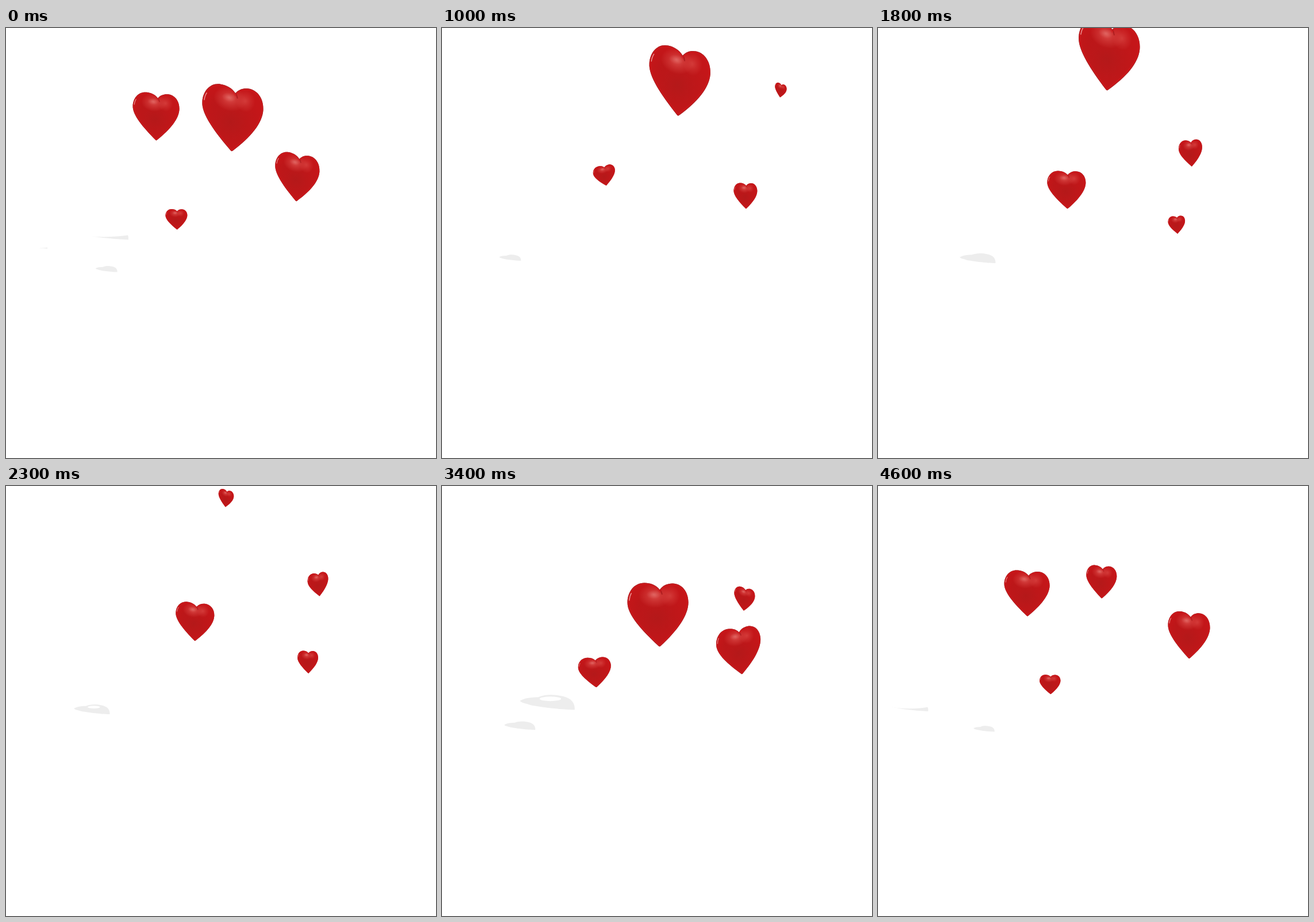
An HTML page with a canvas that plays this animation: 748 by 748 pixels, repeating every 4700 ms.

```html
<!DOCTYPE html>
<html lang="en">
<head>
<meta charset="utf-8">
<title>Rising hearts</title>
<style>
  html, body { margin: 0; width: 100%; height: 100%; overflow: hidden; background: #fff; }
  canvas { display: block; width: 748px; height: 748px; }
</style>
</head>
<body>
<canvas id="stage" width="748" height="748"></canvas>
<script>
const ctx = document.getElementById('stage').getContext('2d');
const LOOP = 4700, STEP = 100;
const GROW = 450, SHRINK = 400;

// Shapes in a unit box
const outline = new Path2D(
  'M.53 .105C.47 .03 .37 0 .28 0C.11 0 0 .14 0 .31C0 .5 .23 .735 .515 .988' +
  'Q.53 1 .545 .988C.83 .735 1 .5 1 .3C1 .13 .89 .005 .74 .005C.66 .005 .58 .035 .53 .105Z');
const crease = new Path2D('M.53 .095Q.555 .13 .57 .18');
const glint = new Path2D('M.03 .28Q.035 .21 .065 .16');
const shade = new Path2D(
  'M0 .4C.08 .22 .2 .17 .33 .16C.45 -.04 .62 -.02 .75 .08C.9 .18 1 .45 .99 .98' +
  'C.75 .97 .3 .78 .17 .65C.1 .56 .02 .52 0 .4Z');

// Each heart drifts from one point to another over its life, bent by bow
const hearts = [];
function heart(born, dies, size, from, to, lean = [0, 0], bow = [0, 0]) {
  hearts.push({ born, dies, size, from, to, lean, bow });
}

heart(1350, 3400, 67, [327, 323], [331, 134], [-.06, .28]);
heart(1430, 3800, 36, [513, 363], [523, 145], [-.15, .28], [9, 25]);
heart(550, 2650, 41, [510, 334], [537, 138], [.08, -.2], [18, 0]);
heart(2450, 4310, 77, [489, 394], [541, 182], [-.3, 0]);
heart(-500, 1105, 77, [504, 334], [604, 92], [.1, .3], [-33, 0]);
heart(4150, 5200, 73, [541, 311], [541, 190], [.08, .08]);
heart(-500, 700, 81, [259, 210], [264, 75], [.05, .12]);
heart(3075, 5200, 79, [267, 361], [256, 118], [-.1, .12]);
heart(-1000, 1400, 38, [311, 410], [276, 225], [.2, -.28]);
heart(3600, 5200, 36.5, [323, 389], [285, 319]);
heart(-600, 2400, 106, [365, 199], [378, 16], [.12, .22], [42, -10]);
heart(2300, 4800, 106, [399, 277], [395, 157], [-.05, .08], [-22, 0]);

const mix = (a, b, p) => a + (b - a) * p;

function pose({ born, dies, size, from, to, lean, bow }, t) {
  const p = (t - born) / (dies - born), bend = 4 * p * (1 - p);
  const x = mix(from[0], to[0], p) + bow[0] * bend;
  const y = mix(from[1], to[1], p) + bow[1] * bend;
  const w = size * Math.min(1, (t - born) / GROW, (dies - t) / SHRINK);
  // Hearts look taller when high up and to the right
  const h = w * (.9 + .0006 * (380 - y + Math.max(0, x - 280)));
  return { x, y, w, h, lean: mix(lean[0], lean[1], p) };
}

function blob(x, y, rx, ry, rgb, alpha) {
  ctx.save();
  ctx.translate(x, y);
  ctx.scale(rx, ry);
  const g = ctx.createRadialGradient(0, 0, 0, 0, 0, 1);
  g.addColorStop(0, `rgba(${rgb},${alpha})`);
  g.addColorStop(.5, `rgba(${rgb},${alpha * .45})`);
  g.addColorStop(1, `rgba(${rgb},0)`);
  ctx.fillStyle = g;
  ctx.fillRect(-1, -1, 2, 2);
  ctx.restore();
}

function line(path, color, width) {
  ctx.strokeStyle = color;
  ctx.lineWidth = width;
  ctx.stroke(path);
}

function drawHeart({ x, y, w, h, lean: k }) {
  const tall = Math.abs(k) * .23; // height that the lean adds
  ctx.save();
  ctx.translate(x, y);
  ctx.scale(w, h / (1 + tall));
  ctx.transform(1, k, -k / 2, 1, -.5 + .15 * k, -.5 - k / 2 + tall / 2);
  ctx.fillStyle = '#c41619';
  ctx.fill(outline);
  ctx.clip(outline);
  blob(.48, .55, .52, .5, '172,26,26', .65);
  blob(.2, .32, .2, .28, '180,22,24', .4);
  blob(.45, .2, .27, .19, '228,95,90', .7);
  blob(.43, .18, .12, .07, '240,160,155', .35);
  blob(.7, .2, .16, .17, '222,80,76', .6);
  line(crease, 'rgba(135,8,12,.45)', .02);
  line(outline, 'rgba(214,22,26,.5)', .06);
  line(outline, 'rgba(150,45,48,.55)', .018);
  line(glint, 'rgba(250,205,205,.65)', .014);
  ctx.restore();
}

// The higher a heart, the farther its shadow falls and the barer its middle
function drawShade({ x, y, w }) {
  const bare = .8 * (250 - y + 1.5 * Math.max(0, x - 420)) / w;
  if (bare > 1.2) return;
  const sw = w * .85 + 6 + .45 * Math.max(0, x - 420), sh = sw * .28;
  const sx = x - 94 - .54 * (372 - y) - .17 * w;
  const sy = 429 - .255 * (371 - y) - Math.min(22, Math.max(0, .2 * (x - 300)));
  ctx.save();
  ctx.filter = 'blur(.5px)';
  ctx.translate(sx - sw / 2, sy - sh / 2);
  ctx.scale(sw, sh);
  const keep = new Path2D();
  keep.rect(-1, -1, 3, 3);
  if (bare > 0) {
    keep.moveTo(.55 + bare, .27);
    keep.ellipse(.55, .27, bare, bare * .75, 0, 0, 2 * Math.PI);
  }
  ctx.clip(keep, 'evenodd');
  ctx.fillStyle = '#ededed';
  ctx.fill(shade);
  ctx.restore();
}

function frame() {
  const t = Math.floor(performance.now() % LOOP / STEP) * STEP;
  ctx.fillStyle = '#fff';
  ctx.fillRect(0, 0, 748, 748);
  const poses = hearts.map(life => pose(life, t)).filter(p => p.w > 1);
  poses.forEach(drawShade);
  poses.forEach(drawHeart);
  requestAnimationFrame(frame);
}
frame();
</script>
</body>
</html>
```
